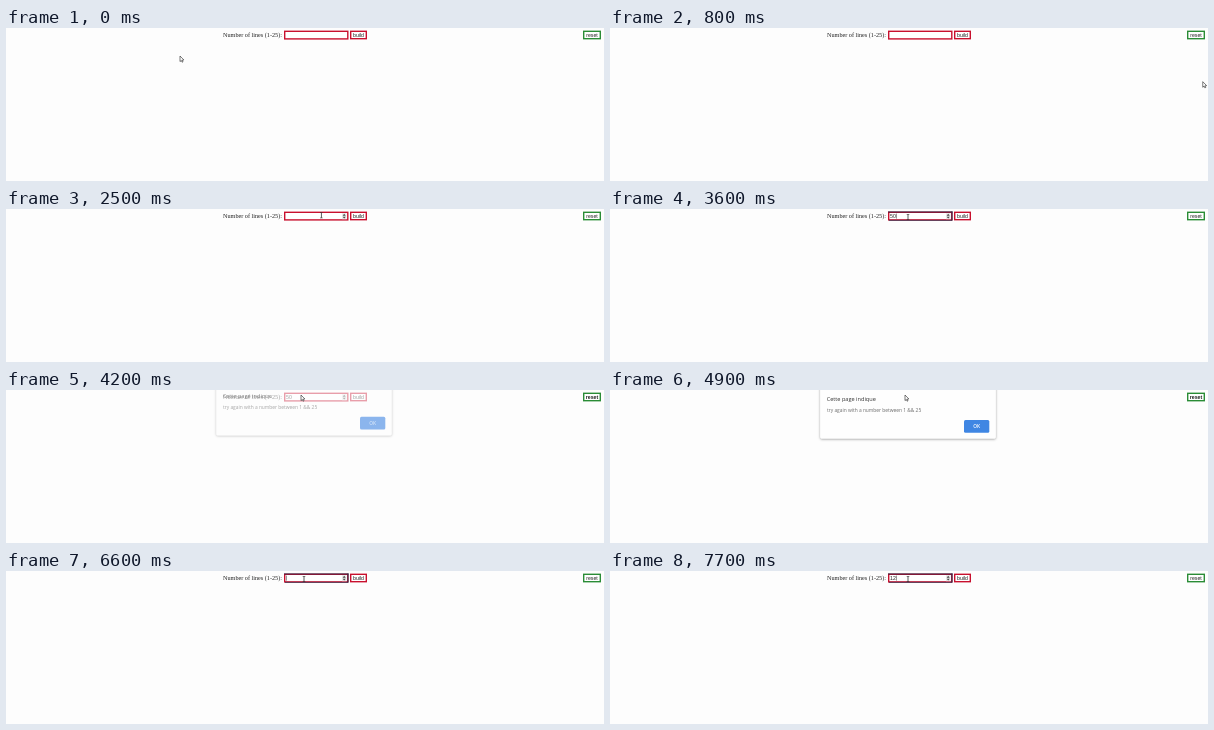
Recreate the animation shown at these times as an HTML page with a canvas. Size 598 px wide and 153 px high, loop 8 s.

```html
<!DOCTYPE html>
<html lang="en">
<head>
<meta charset="utf-8">
<title>Number of lines</title>
<style>
html, body { margin: 0; width: 100%; height: 100%; overflow: hidden; background: #fdfdfd; }
canvas { display: block; }
</style>
</head>
<body>
<canvas id="stage" width="598" height="153"></canvas>
<script>
const ctx = document.getElementById('stage').getContext('2d');
const LOOP = 8000, STEP = 100;
const SERIF = '"Liberation Serif", serif';
const SANS = '"Liberation Sans", sans-serif';
const DIALOG = '"Open Sans", sans-serif';
const RED = '#c8102e', GREEN = '#2a8c36', NAVY = '#1c2544', INK = '#222';
const DIALOG_OPENS = 4000, DIALOG_CLOSES = 5800, DIALOG_GONE = 6100;

const mix = (a, b, k) => a + (b - a) * k;
const ramp = (t, from, to) => Math.min(1, Math.max(0, (t - from) / (to - from)));
const bezier = (a, b, c, k) => mix(mix(a, b, k), mix(b, c, k), k);
const during = (t, from, to) => t >= from && t < to;

// The first number is typed, erased from its end, then replaced.
function fieldValue(t) {
  const keys = (start, gap) => Math.max(0, Math.floor((t - start) / gap) + 1);
  if (t < 6400) return '50'.slice(0, keys(3400, 200));
  if (t < 7200) return '50'.slice(0, Math.max(0, 2 - keys(6400, 200)));
  return '12'.slice(0, keys(7200, 200));
}

function dialogAlpha(t) {
  return Math.min(ramp(t, 3900, 4400), 1 - ramp(t, 5680, 6080));
}

function text(str, x, y, font, color, align = 'left') {
  ctx.font = font;
  ctx.fillStyle = color;
  ctx.textAlign = align;
  ctx.fillText(str, x, y);
}

function frame(x, y, w, h, color, line = 1.4) {
  ctx.fillStyle = '#fff';
  ctx.fillRect(x, y, w, h);
  ctx.strokeStyle = color;
  ctx.lineWidth = line;
  ctx.strokeRect(x + line / 2, y + line / 2, w - line, h - line);
}

function button(label, x, w, color, weight = '') {
  frame(x, 2.6, w, 8.8, color);
  text(label, x + w / 2, 8.8, weight + ' 5.2px ' + SANS, INK, 'center');
}

function rounded(x, y, w, h) {
  ctx.beginPath();
  ctx.roundRect(x, y, w, h, 1.5);
}

function triangle(x, y, dy) {
  ctx.beginPath();
  ctx.moveTo(x - 1.5, y);
  ctx.lineTo(x + 1.5, y);
  ctx.lineTo(x, y + dy);
  ctx.fill();
}

function drawForm(t) {
  const focused = t >= 3000 && !during(t, DIALOG_OPENS, DIALOG_GONE);
  const value = fieldValue(t);
  text('Number of lines (1-25):', 217, 9, '6.2px ' + SERIF, INK);
  frame(278, 2.6, 64.5, 9, RED);
  if (focused) {
    ctx.fillStyle = NAVY;
    ctx.fillRect(278, 2.5, 64.5, .9);
    ctx.fillRect(341.5, 2.5, 1, 9);
    ctx.fillRect(279, 10.9, 63, .7);
  }
  if (t >= 2500) {
    ctx.fillStyle = '#e9e9e9';
    ctx.fillRect(336, 4.2, 4.5, 6);
    ctx.fillStyle = '#444';
    triangle(338.2, 6.7, -1.9);
    triangle(338.2, 7.7, 1.9);
  }
  text(value, 280, 9, '5.2px ' + SANS, INK);
  if (focused) {
    ctx.fillStyle = '#333';
    ctx.fillRect(280.3 + ctx.measureText(value).width, 4.6, .5, 5);
  }
  button('build', 344, 17, RED);
}

function drawShadow() {
  ctx.save();
  ctx.beginPath();
  ctx.rect(0, -40, 598, 200);
  ctx.roundRect(210.3, -12, 175.4, 60.6, 1.5);
  ctx.clip('evenodd');
  ctx.shadowColor = 'rgba(0,0,0,.45)';
  ctx.shadowBlur = 2.5;
  ctx.shadowOffsetY = .6;
  rounded(210.3, -12, 175.4, 60.6);
  ctx.fill();
  ctx.restore();
}

function drawDialog(alpha) {
  if (!alpha) return;
  ctx.save();
  ctx.globalAlpha = alpha;
  ctx.translate(0, -8 * (1 - alpha));
  ctx.fillStyle = '#fefefe';
  drawShadow();
  rounded(210.3, -12, 175.4, 60.6);
  ctx.fill();
  text('Cette page indique', 216.7, 11, '5.6px ' + DIALOG, '#333');
  text('try again with a number between 1 && 25', 217, 22, '4.87px ' + DIALOG, '#6c6c6c');
  ctx.fillStyle = '#3f86e3';
  rounded(354, 30, 25.3, 12.7);
  ctx.fill();
  text('OK', 366.6, 38, '600 4.8px ' + DIALOG, '#fff', 'center');
  ctx.restore();
}

function drawArrow(x, y) {
  ctx.beginPath();
  ctx.moveTo(x, y);
  ctx.lineTo(x, y + 5.6);
  ctx.lineTo(x + 1.3, y + 4.4);
  ctx.lineTo(x + 2.1, y + 6.2);
  ctx.lineTo(x + 3, y + 5.8);
  ctx.lineTo(x + 2.2, y + 4.1);
  ctx.lineTo(x + 3.9, y + 4);
  ctx.closePath();
  ctx.fillStyle = '#fff';
  ctx.fill();
  ctx.strokeStyle = '#333';
  ctx.lineWidth = .65;
  ctx.stroke();
}

function drawBeam(x, y) {
  ctx.fillStyle = '#333';
  ctx.fillRect(x - .4, y - 2.6, .8, 5.2);
  ctx.fillRect(x - 1.3, y - 3, 2.6, .6);
  ctx.fillRect(x - 1.3, y + 2.3, 2.6, .6);
}

function drawPointer(t) {
  if (t < 1300) {
    const k = ramp(t, 0, 900);
    drawArrow(bezier(174, 670, 580, k), bezier(28, -30, 75, k));
  } else if (t < 1500) {
    drawArrow(507, 23);
  } else if (during(t, DIALOG_OPENS, DIALOG_CLOSES)) {
    drawArrow(295, 5);
  } else if (t >= 2300) {
    const k = ramp(t, 2300, 2600);
    const draw = t < 2400 ? drawArrow : drawBeam;
    draw(mix(350, 298, k), mix(3, 8, k));
  }
}

function render(now) {
  const t = Math.floor((now % LOOP) / STEP) * STEP;
  ctx.fillStyle = '#fdfdfd';
  ctx.fillRect(0, 0, 598, 153);
  drawForm(t);
  button('reset', 577, 18, GREEN, during(t, DIALOG_OPENS, DIALOG_GONE) ? 'bold' : '');
  drawDialog(dialogAlpha(t));
  drawPointer(t);
}

const start = performance.now();
function tick() {
  render(performance.now() - start);
  requestAnimationFrame(tick);
}
tick();
</script>
</body>
</html>
```
